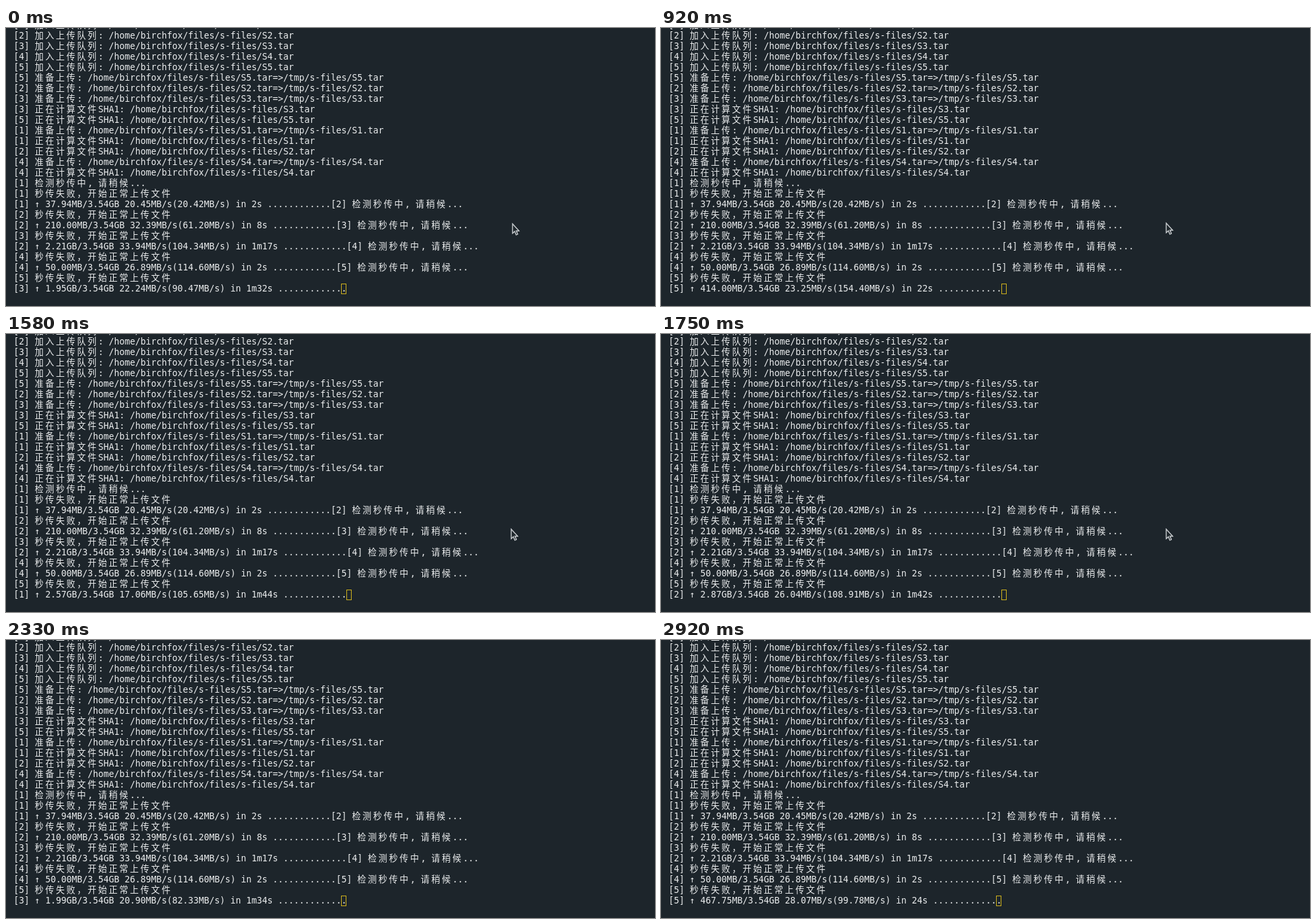
These frames come from a looping animation (982x422 px, 3.01 s). An HTML page with a canvas:

```html
<!DOCTYPE html>
<html lang="zh-CN">
<head>
<meta charset="utf-8">
<style>
  html, body { margin: 0; width: 100%; height: 100%; overflow: hidden; background: #1d252b; }
  canvas { display: block; }
</style>
</head>
<body>
<canvas width="982" height="422"></canvas>
<script>
const ctx = document.querySelector('canvas').getContext('2d');
const LOOP = 3010, CELL = 8, ROW = 16, LEFT = 11.5, BASE = 15.7;
const DOTS = '.'.repeat(12);

const home = n => `/home/birchfox/files/s-files/S${n}.tar`;
const queue = n => `[${n}] 加入上传队列: ${home(n)}`;
const prep = n => `[${n}] 准备上传: ${home(n)}=>/tmp/s-files/S${n}.tar`;
const hash = n => `[${n}] 正在计算文件SHA1: ${home(n)}`;
const check = n => `[${n}] 检测秒传中, 请稍候...`;
const fail = n => `[${n}] 秒传失败，开始正常上传文件`;
const upload = (n, done, speed, total, time) =>
  `[${n}] ↑ ${done}/3.54GB ${speed}MB/s(${total}MB/s) in ${time} ${DOTS}`;

// The first line is scrolled almost off the top.
const lines = [
  queue(1), queue(2), queue(3), queue(4), queue(5),
  prep(5), prep(2), prep(3), hash(3), hash(5),
  prep(1), hash(1), hash(2), prep(4), hash(4),
  check(1), fail(1),
  upload(1, '37.94MB', '20.45', '20.42', '2s') + check(2), fail(2),
  upload(2, '210.00MB', '32.39', '61.20', '8s') + check(3), fail(3),
  upload(2, '2.21GB', '33.94', '104.34', '1m17s') + check(4), fail(4),
  upload(4, '50.00MB', '26.89', '114.60', '2s') + check(5), fail(5)
];

const progress = [
  [0, upload(3, '1.95GB', '22.24', '90.47', '1m32s')],
  [500, upload(1, '2.56GB', '17.63', '91.39', '1m43s')],
  [670, upload(2, '2.84GB', '25.18', '112.36', '1m41s')],
  [830, upload(4, '642.00MB', '24.71', '120.52', '25s')],
  [920, upload(5, '414.00MB', '23.25', '154.40', '22s')],
  [1000, upload(3, '1.97GB', '21.46', '88.12', '1m33s')],
  [1580, upload(1, '2.57GB', '17.06', '105.65', '1m44s')],
  [1670, upload(2, '2.87GB', '26.04', '108.91', '1m42s')],
  [1830, upload(4, '667.25MB', '25.33', '116.08', '26s')],
  [1920, upload(5, '440.50MB', '25.62', '121.37', '23s')],
  [2000, upload(3, '1.99GB', '20.90', '82.33', '1m34s')],
  [2500, upload(1, '2.59GB', '17.82', '96.27', '1m45s')],
  [2580, upload(2, '2.89GB', '25.57', '103.44', '1m43s')],
  [2750, upload(4, '691.50MB', '24.95', '109.63', '27s')],
  [2920, upload(5, '467.75MB', '28.07', '99.78', '24s')]
];

// time, x, y of the pointer tip
const pointer = [
  [0, 766, 297], [80, 765, 296.5], [170, 764, 296],
  [1920, 766, 296], [2000, 768, 296], [2080, 806, 226],
  [2170, 884, 88], [2250, 882, 4], [2330, -50, 0]
];

const at = (steps, t) => steps.findLast(s => s[0] <= t);

function print(text, row) {
  let col = 0;
  for (const ch of text) {
    ctx.fillText(ch, LEFT + col * CELL, BASE + row * ROW);
    col += ch > '\u2fff' ? 2 : 1;
  }
  return col;
}

function drawPointer(x, y) {
  ctx.save();
  ctx.translate(x, y);
  ctx.fillStyle = '#20282d';
  ctx.strokeStyle = '#c3c7ca';
  ctx.lineWidth = 1.3;
  ctx.stroke(arrow);
  ctx.fill(arrow);
  ctx.stroke(arrow);
  ctx.restore();
}
const arrow = new Path2D('M.5 .5V14.5L3.7 11.7L6 17L8.2 16L6 10.8H10Z');

function draw(now) {
  const t = now % LOOP;
  ctx.fillStyle = '#1d252b';
  ctx.fillRect(0, 0, 982, 422);
  ctx.font = '13.3px "DejaVu Sans Mono", "Noto Sans CJK SC", "Noto Sans CJK", monospace';
  ctx.fillStyle = '#eceeef';
  lines.forEach((line, i) => print(line, i - 1));

  // A shorter line leaves the last dot of a longer one behind.
  const end = print(at(progress, t)[1].padEnd(63, '.'), 24) && at(progress, t)[1].length;
  ctx.strokeStyle = '#d0b21c';
  ctx.lineWidth = 1;
  ctx.strokeRect(12 + end * CELL - .5, 388.5, 7, 15);

  drawPointer(...at(pointer, t).slice(1));
  requestAnimationFrame(draw);
}
requestAnimationFrame(draw);
</script>
</body>
</html>
```
